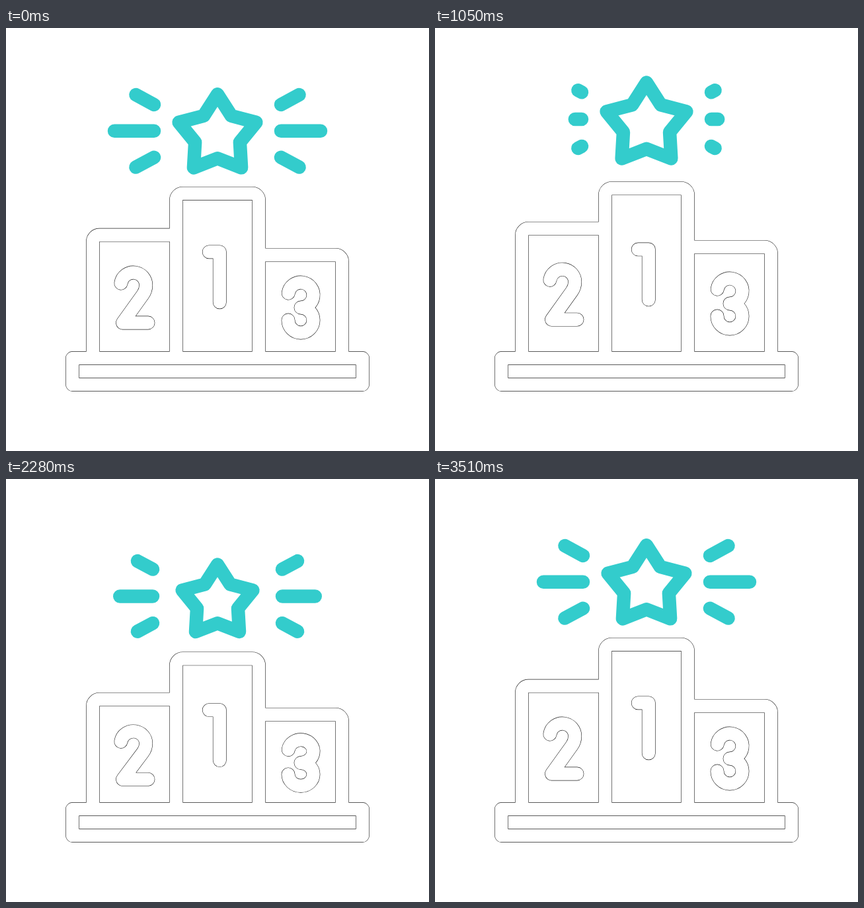
An HTML page with a canvas for the animation above (3540 ms loop, 640 px wide and 640 px high).

```html
<!DOCTYPE html>
<html lang="en">
<head>
<meta charset="utf-8">
<title>Podium</title>
<style>
  html, body { margin: 0; width: 100%; height: 100%; overflow: hidden; background: #fff; }
  canvas { display: block; width: 640px; height: 640px; }
</style>
</head>
<body>
<canvas id="stage" width="640" height="640"></canvas>
<script>
const ctx = document.getElementById('stage').getContext('2d');
const LOOP = 3540, STEP = 30, STAGGER = 60, TEAL = '#33cccc', PI = Math.PI;
ctx.lineCap = ctx.lineJoin = 'round';

// Smooth step from 0 to 1 between two times.
function ease(time, from, to) {
  const u = Math.min(1, Math.max(0, (time - from) / (to - from)));
  return u * u * (3 - 2 * u);
}

// Podium bounce: sink, spring up, hover, fall back, settle.
function drop(t) {
  return 38 * ease(t, 120, 630) - 41 * ease(t, 630, 870) - 22 * ease(t, 800, 1640)
    + 47 * ease(t, 1940, 2300) - 24 * ease(t, 2300, 2540)
    - 2.5 * ease(t, 2600, 2850) + 4.5 * ease(t, 2850, 3270);
}

// Extra height of star and rays while the podium hovers.
const lift = t => 16.5 * (ease(t, 690, 1320) - ease(t, 1980, 2280));

const rayLength = t => 60 - 60 * ease(t, 0, 540) + 35 * ease(t, 900, 1320)
  + 31 * ease(t, 1980, 2600) - 6 * ease(t, 3000, 3510);
const rayShift = t => 2 * ease(t, 0, 540) + 9 * ease(t, 2280, 2900) - 11 * ease(t, 3000, 3400);

function outlined(build) {
  ctx.beginPath();
  build();
  for (const [color, width] of [['#222', 20.8], ['#fff', 19.6]]) {
    ctx.strokeStyle = color;
    ctx.lineWidth = width;
    ctx.stroke();
  }
}

function bars(y1, y2, y3) {
  const r = 10, floor = 499.5;
  ctx.rect(100.5, floor, 439, 40);
  ctx.moveTo(257.5, floor);
  ctx.arcTo(257.5, y1, 320, y1, r);
  ctx.arcTo(382.5, y1, 382.5, floor, r);
  ctx.lineTo(382.5, floor);
  ctx.moveTo(131.5, floor);
  ctx.arcTo(131.5, y2, 200, y2, r);
  ctx.lineTo(257.5, y2);
  ctx.moveTo(382.5, y3);
  ctx.arcTo(508.5, y3, 508.5, floor, r);
  ctx.lineTo(508.5, floor);
}

// Digits are centred on y = 0.
function one() {
  ctx.moveTo(307.3, -38);
  ctx.lineTo(323.3, -38);
  ctx.lineTo(323.3, 38);
}

function two() {
  ctx.arc(192.7, -19, 19, PI + .15, PI * 2);
  ctx.quadraticCurveTo(211.7, -11, 207, -4.5);
  ctx.lineTo(176.5, 38);
  ctx.lineTo(215, 38);
}

function three() {
  ctx.arc(446, -19, 19, PI + .15, PI * 2.5);
  ctx.arc(446, 19, 19, -PI / 2, PI);
}

function digit(build, y, squash) {
  outlined(() => {
    ctx.save();
    ctx.translate(0, y);
    ctx.scale(1, 1 - Math.max(0, squash) / 76);
    build();
    ctx.restore();
  });
}

function star(cy, radius) {
  ctx.beginPath();
  for (let i = 0; i < 10; i++) {
    const a = i * PI / 5, r = i % 2 ? radius * .58 : radius;
    ctx.lineTo(320 + r * Math.sin(a), cy - r * Math.cos(a));
  }
  ctx.closePath();
  ctx.stroke();
}

function rays(y, length, shift) {
  if (length < .5) return;
  ctx.beginPath();
  for (const side of [-1, 1]) {
    for (const row of [-1, 0, 1]) {
      const dx = row ? .88 : 1, dy = row * .475, size = row ? length / 2 + 1.3 : length;
      const x0 = 96 + shift, y0 = y + row * (39.9 + shift * .45);
      ctx.moveTo(320 + side * x0, y0);
      ctx.lineTo(320 + side * (x0 + size * dx), y0 + size * dy);
    }
  }
  ctx.stroke();
}

function draw(time) {
  const [d1, d2, d3] = [0, 1, 2].map(i => drop(time + i * STAGGER));
  const top = 240.3 + d1, grow = -.4 * drop(time - 80);

  ctx.clearRect(0, 0, 640, 640);
  outlined(() => bars(top + 10, 313.2 + d2, 343.4 + d3));
  digit(one, 376.8 + d1 / 2, 0);
  digit(two, 408 + d2 / 2, .16 * d1);
  digit(three, 423 + d3 / 2, .32 * d2);

  ctx.strokeStyle = TEAL;
  ctx.lineWidth = 20.5;
  star(top - 78.6 - .45 * grow - .7 * lift(time), 61.4 + grow);
  rays(top - 84.5 - lift(time), rayLength(time), rayShift(time));
}

function tick() {
  draw(Math.floor(performance.now() % LOOP / STEP) * STEP);
  requestAnimationFrame(tick);
}
tick();
</script>
</body>
</html>
```
